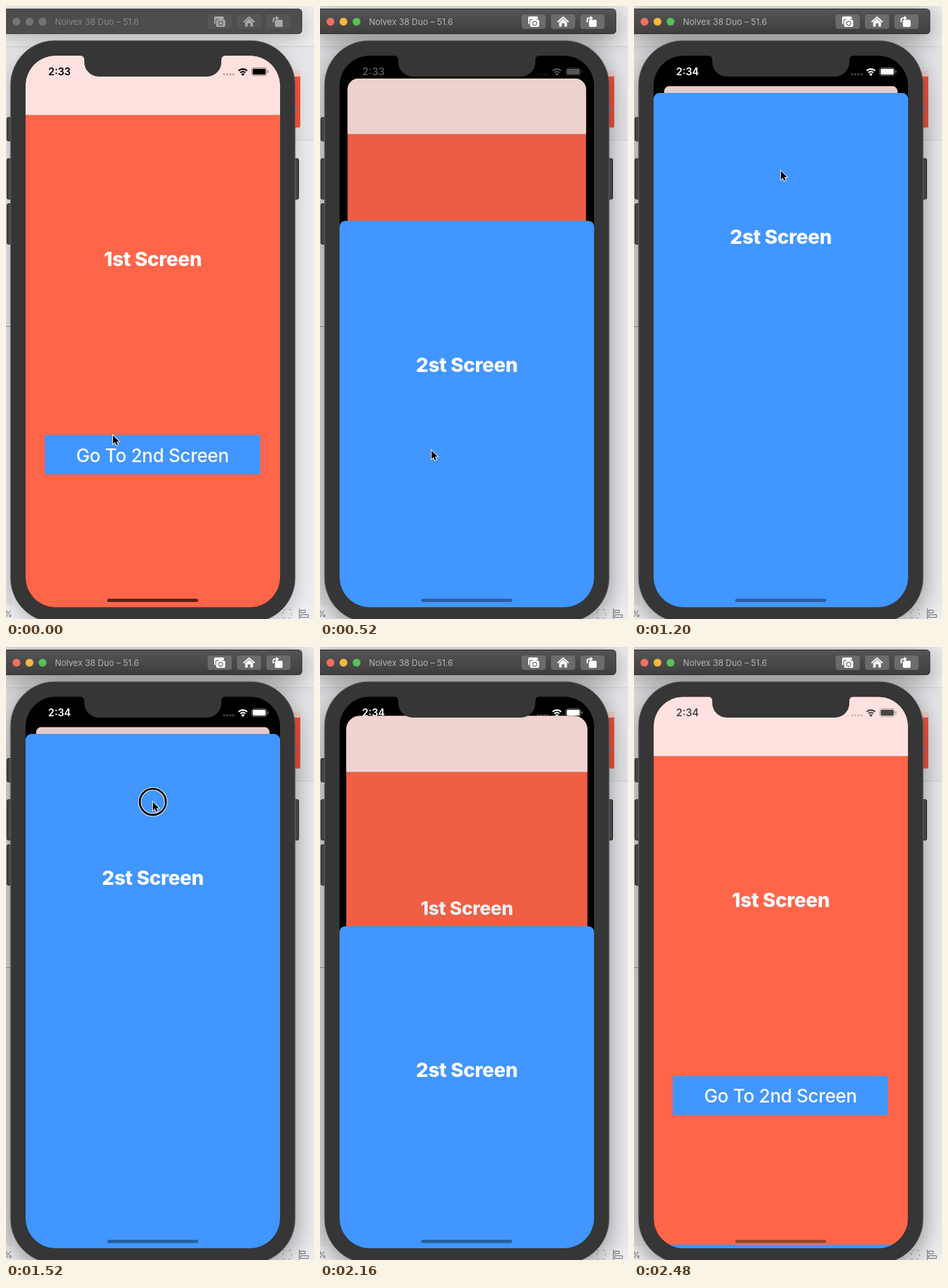
An HTML page with a canvas for the animation above (2.52 s loop, 472 px wide and 938 px high).

```html
<!DOCTYPE html>
<html lang="en">
<head>
<meta charset="utf-8">
<title>Sheet presentation</title>
<style>
  html, body { margin: 0; width: 100%; height: 100%; overflow: hidden; background: #e6e6ea; }
  canvas { display: block; width: 472px; height: 938px; }
</style>
</head>
<body>
<canvas id="stage" width="472" height="938"></canvas>
<script>
const ctx = document.getElementById('stage').getContext('2d');
const LOOP = 2520, STEP = 40;
const PRESENT = 385, RELEASE = 2130;
const TOP = 133, BOTTOM = 920;
const BLUE = '#4196ff', ORANGE = '#ff6549', PINK = '#ffe2df';

// time, x, y
const POINTER = [
  [0, 164, 657], [200, 170, 680], [560, 171, 680], [840, 225, 439],
  [1100, 225, 260], [1400, 225, 237], [1550, 225, 237], [1840, 234, 484], [2100, 237, 685]
];
const DRAG = [[1550, TOP], [1840, 242], [RELEASE, 365]];

const clamp = v => Math.min(1, Math.max(0, v));
const ramp = (t, a, b) => clamp((t - a) / (b - a));

// Remaining distance of a critically damped spring
const spring = (ms, w) => { const x = Math.max(0, ms) * w / 1000; return (1 + x) * Math.exp(-x); };

function track(keys, t) {
  let i = 0;
  while (i < keys.length - 2 && t > keys[i + 1][0]) i++;
  const a = keys[i], b = keys[i + 1], k = ramp(t, a[0], b[0]);
  return a.slice(1).map((v, n) => v + (b[n + 1] - v) * k);
}

function sheetTop(t) {
  if (t < 1550) return TOP + (BOTTOM - TOP) * spring(t - PRESENT, 20);
  if (t < RELEASE) return track(DRAG, t)[0];
  return BOTTOM - (BOTTOM - 365) * spring(t - RELEASE, 19);
}

function box(x, y, w, h, r, fill, stroke) {
  ctx.beginPath();
  ctx.roundRect(x, y, w, h, r);
  if (fill) { ctx.fillStyle = fill; ctx.fill(); }
  if (stroke) { ctx.strokeStyle = stroke; ctx.lineWidth = 1; ctx.stroke(); }
}

function dot(x, y, r, fill) {
  ctx.beginPath();
  ctx.arc(x, y, r, 0, 7);
  ctx.fillStyle = fill;
  ctx.fill();
}

function label(text, x, y, font, fill, align = 'center', spacing = 0) {
  ctx.font = font + ' Inter, Roboto, sans-serif';
  ctx.fillStyle = fill;
  ctx.textAlign = align;
  ctx.letterSpacing = spacing + 'px';
  ctx.fillText(text, x, y);
}

function shade(y0, y1, ...colors) {
  const g = ctx.createLinearGradient(0, y0, 0, y1);
  colors.forEach((c, i) => g.addColorStop(i / (colors.length - 1), c));
  return g;
}

function withShadow(active, paint) {
  ctx.save();
  ctx.shadowColor = `rgba(0,0,0,${active ? .42 : .22})`;
  ctx.shadowBlur = active ? 38 : 26;
  ctx.shadowOffsetY = 8;
  paint();
  ctx.restore();
}

function desktop() {
  box(0, 0, 472, 938, 0, '#ececf0');
  box(0, 0, 472, 62, 0, '#ececec');
  box(0, 62, 472, 143, 0, '#e6e6ea');
  box(0, 62, 9, 876, 0, '#e4e4e6');
  box(0, 61.5, 472, 1, 0, '#d2d2d5');
  box(440, 204.5, 32, 1, 0, '#cfcfd3');
  box(0, 490, 8, 1, 0, '#999');
  box(436, 99, 15, 87, 2, '#f9553c');
  box(436, 99, 15, 9, 2, '#f6d4d1');
  box(440, 155, 5, 5, 0, BLUE);
  box(0, 917, 472, 21, 0, '#eeeef0');
  label('%', -3, 935, '13px', '#666', 'left');
  ctx.strokeStyle = '#aaa';
  ctx.lineWidth = 1;
  ctx.setLineDash([4, 5]);
  ctx.strokeRect(424.5, 923.5, 13, 13);
  ctx.setLineDash([]);
  box(449, 922, 1, 16, 0, '#666');
  box(451.5, 924.5, 7, 4, 0, null, '#666');
  box(451.5, 931.5, 12, 4, 0, null, '#666');
}

function titleBar(active) {
  withShadow(active, () => box(-8, 4, 462, 39, 6, active ? '#2f2f2f' : '#454545'));
  box(-8, 5, 461.5, 37, 5, active ? shade(5, 42, '#545454', '#404040') : '#4d4d4d');
  const lights = active ? ['#f3705f', '#f6b93f', '#58c557'] : ['#747474', '#747474', '#747474'];
  lights.forEach((c, i) => dot(16 + 20 * i, 24, 6, c));
  label('Nolvex 38 Duo – 51.6', 75, 29, '13px', active ? '#b8b8b8' : '#888', 'left');

  const back = active ? '#6c6c6c' : '#565656', ink = active ? '#fff' : '#a8a8a8';
  [309, 354, 399].forEach(x => box(x, 13, 37, 22, 4, back));

  box(319, 16, 15, 12, 2, ink);
  box(321, 20, 16, 14, 2, back);
  box(322, 21, 14, 11, 2, ink);
  box(326, 19.5, 6, 3, 1, ink);
  dot(329, 26.5, 3.7, back);
  dot(329, 26.5, 2.5, ink);

  ctx.strokeStyle = ink;
  ctx.lineWidth = 2;
  ctx.stroke(new Path2D('M364 24.5L372.5 17L381 24.5'));
  ctx.fill(new Path2D('M366.5 24.5L372.5 19.5L378.5 24.5V31.5H374.5V26.5H370.5V31.5H366.5Z'));

  box(412, 21, 12, 11, 2, ink);
  ctx.stroke(new Path2D('M409.5 25V21Q409.5 18.5 412 18.5H415'));
  ctx.fill(new Path2D('M414 15L418.5 18.5L414 22Z'));
}

function phoneBody(active) {
  withShadow(active, () => box(7, 53, 436, 890, 68, '#363636'));
  [[1, 170, 37], [1, 233, 63], [1, 302, 63], [440, 233, 63]].forEach(([x, y, h]) => {
    box(x + .5, y + .5, 8, h - 1, 2, '#444', '#222');
  });
  box(7, 53, 436, 890, 68, '#363636', '#666');
}

function statusBar(t) {
  const light = ramp(t, 440, 680) - ramp(t, 2300, 2550);
  const v = Math.round(255 * light), ink = `rgb(${v},${v},${v})`;
  label(t < 1200 ? '2:33' : '2:34', 82, 106, '600 15.5px', ink);
  ctx.globalAlpha = .27;
  for (let i = 0; i < 4; i++) dot(334.3 + 4.7 * i, 104.5, 1.7, ink);
  ctx.globalAlpha = 1;
  ctx.strokeStyle = ink;
  ctx.lineWidth = 2.3;
  [5.5, 9.5].forEach(r => {
    ctx.beginPath();
    ctx.arc(363, 106, r, -2.33, -.81);
    ctx.stroke();
  });
  ctx.fillStyle = ink;
  ctx.fill(new Path2D('M363 107L360.3 104.2Q363 102 365.7 104.2Z'));
  ctx.globalAlpha = .45;
  box(376.5, 94.5, 23, 12, 3.5, null, ink);
  box(400.7, 98.5, 1.5, 4, 1, ink);
  ctx.globalAlpha = 1;
  box(378, 96, 20, 9, 2, ink);
}

function firstScreen(p) {
  const s = 1 - .083 * p;
  ctx.save();
  ctx.translate(225, 76 + 46.6 * p);
  ctx.scale(s, s);
  ctx.translate(-225, -76);
  ctx.beginPath();
  ctx.roundRect(30, 76, 390, 850, 9 + 36 * (1 - p));
  ctx.clip();
  box(30, 76, 390, 850, 0, ORANGE);
  box(30, 76, 390, 91, 0, PINK);
  box(30, 166.5, 390, .7, 0, 'rgba(90,30,20,.3)');
  label('1st Screen', 225, 398, '800 30px', '#fff', 'center', -.3);
  box(59.5, 656.5, 330, 60, 0, BLUE);
  label('Go To 2nd Screen', 224.5, 697.5, '450 28px', '#fff', 'center', -.3);
  box(30, 76, 390, 850, 0, `rgba(0,0,0,${.1 * p})`);
  ctx.restore();
}

function screen(t) {
  const y = sheetTop(t), p = clamp((BOTTOM - y) / (BOTTOM - TOP));
  const statusBehind = t > RELEASE && t < 2300;
  ctx.save();
  ctx.beginPath();
  ctx.roundRect(30, 76, 390, 844, 46);
  ctx.clip();
  box(30, 76, 390, 844, 0, '#000');
  if (statusBehind) statusBar(t);
  firstScreen(p);
  if (!statusBehind) statusBar(t);
  box(30, y, 390, 860, 9, BLUE);
  label('2st Screen', 225, y + 231, '800 30px', '#fff', 'center', -.3);
  box(155, 907, 139.5, 5, 2.5, `rgba(0,0,0,${t < PRESENT ? .65 : .37})`);
  ctx.restore();
  ctx.fillStyle = '#363636';
  ctx.fill(new Path2D('M114 75V76A6 6 0 0 1 120 82V86A22 22 0 0 0 142 108H308A22 22 0 0 0 330 86V82A6 6 0 0 1 336 76V75Z'));
}

function pointer(t) {
  if (t > RELEASE) return;
  const [x, y] = track(POINTER, t);
  if ((t >= 200 && t < 320) || t >= 1400) {
    [['#fff', 5], ['#000', 3]].forEach(([color, width]) => {
      ctx.beginPath();
      ctx.arc(x, y, 20, 0, 7);
      ctx.strokeStyle = color;
      ctx.lineWidth = width;
      ctx.stroke();
    });
  }
  ctx.save();
  ctx.translate(x, y);
  ctx.scale(.9, .9);
  const arrow = new Path2D('M0 0V14.5L3.3 11.5L5.6 16.8L8.2 15.7L6 10.5H10.5Z');
  ctx.strokeStyle = '#fff';
  ctx.lineWidth = 2;
  ctx.stroke(arrow);
  ctx.fillStyle = '#000';
  ctx.fill(arrow);
  ctx.restore();
}

function draw(now) {
  const t = Math.floor(((now + 2) % LOOP) / STEP) * STEP;
  const active = t >= 240;
  desktop();
  titleBar(active);
  phoneBody(active);
  screen(t);
  pointer(t);
}

const start = performance.now();
function tick() {
  draw(performance.now() - start);
  requestAnimationFrame(tick);
}
tick();
</script>
</body>
</html>
```
